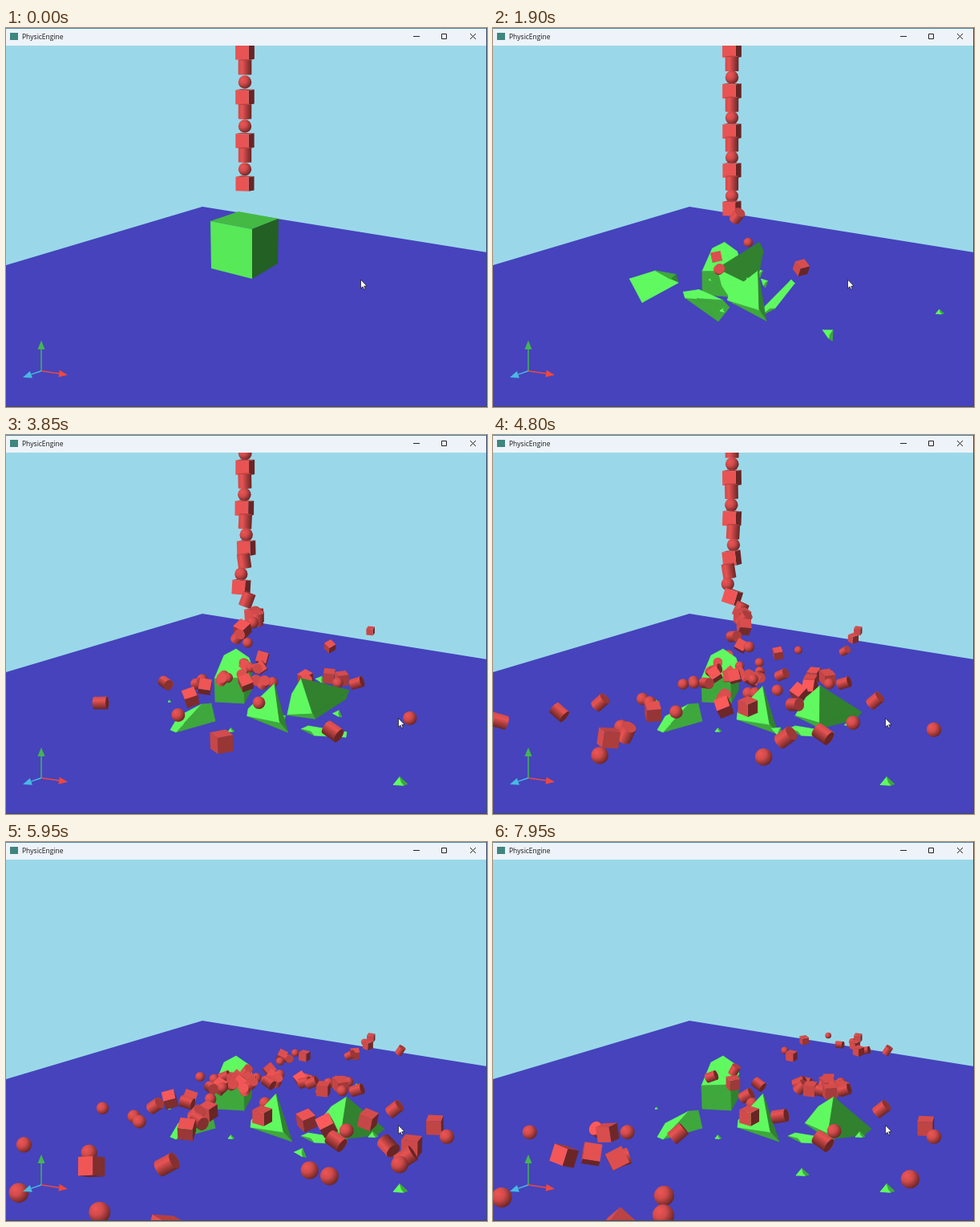
Recreate the animation shown at these times as an HTML page with a canvas. Size 600 px wide and 473 px high, loop 8 s.

```html
<!DOCTYPE html>
<html lang="en">
<head>
<meta charset="utf-8">
<title>PhysicEngine</title>
<style>
  html, body { margin: 0; width: 100%; height: 100%; overflow: hidden; background: #9ad8e9; }
  canvas { display: block; }
</style>
</head>
<body>
<canvas id="stage" width="600" height="473"></canvas>
<script>
const ctx = document.getElementById('stage').getContext('2d');
const LOOP = 8, BREAK = 1.15, COUNT = 93; // times in seconds
const LIGHT = [-0.45, -0.45, 0.77];

const clamp = (v, lo = 0, hi = 1) => Math.min(hi, Math.max(lo, v));
const mix = (a, b, u) => a + (b - a) * u;
const smooth = u => { u = clamp(u); return u * u * (3 - 2 * u); };
const random = seed => { const v = Math.sin(seed * 127.1 + 3.7) * 43758.5453; return v - Math.floor(v); };

function polygon(points, fill, outline) {
  ctx.beginPath();
  points.forEach(([x, y]) => ctx.lineTo(x, y));
  ctx.closePath();
  ctx.fillStyle = fill;
  ctx.fill();
  if (!outline) return;
  ctx.strokeStyle = outline;
  ctx.lineWidth = 0.7;
  ctx.stroke();
}

// ---------- red solids ----------
function rotate([x, y, z], [yaw, pitch, roll]) {
  let c = Math.cos(yaw), s = Math.sin(yaw);
  [x, z] = [x * c - z * s, x * s + z * c];
  c = Math.cos(pitch); s = Math.sin(pitch);
  [y, z] = [y * c + z * s, z * c - y * s];
  c = Math.cos(roll); s = Math.sin(roll);
  return [x * c - y * s, x * s + y * c, z];
}

const red = level => `rgb(${[243, 87, 87].map(c => Math.round(c * level))})`;

function shade(normal) {
  const dot = normal.reduce((sum, v, i) => sum + v * LIGHT[i], 0);
  return red(0.43 + 0.62 * Math.max(0, dot));
}

function drawBox({ x, y, size, angles }) {
  for (let axis = 0; axis < 3; axis++) for (const side of [-1, 1]) {
    const place = (a, b) => {
      const v = [0, 0, 0];
      v[axis] = side; v[(axis + 1) % 3] = a; v[(axis + 2) % 3] = b;
      return rotate(v, angles);
    };
    const normal = place(0, 0);
    if (normal[2] <= 0) continue;
    const corners = [place(1, 1), place(1, -1), place(-1, -1), place(-1, 1)];
    polygon(corners.map(v => [x + v[0] * size / 2, y + v[1] * size / 2]), shade(normal));
  }
}

function drawBall({ x, y, size }) {
  const r = size * 0.46;
  const g = ctx.createRadialGradient(x - r * 0.4, y - r * 0.4, 0, x - r * 0.3, y - r * 0.3, r * 1.4);
  g.addColorStop(0, red(0.98));
  g.addColorStop(0.45, red(0.86));
  g.addColorStop(1, red(0.43));
  ctx.fillStyle = g;
  ctx.beginPath();
  ctx.arc(x, y, r, 0, 7);
  ctx.fill();
}

function drawCylinder({ x, y, size, angles }) {
  let axis = rotate([0, -1, 0], angles);
  if (axis[2] < 0) axis = axis.map(v => -v);
  const r = size * 0.46, turn = Math.atan2(axis[1], axis[0]);
  const half = size * 0.5 * Math.hypot(axis[0], axis[1]), flat = r * axis[2];
  const lit = Math.cos(turn) > Math.sin(turn) ? -r : r;
  const g = ctx.createLinearGradient(0, lit, 0, -lit);
  g.addColorStop(0, red(0.86));
  g.addColorStop(0.3, red(0.95));
  g.addColorStop(1, red(0.43));
  ctx.save();
  ctx.translate(x, y);
  ctx.rotate(turn);
  ctx.beginPath();
  ctx.ellipse(-half, 0, flat, r, 0, Math.PI / 2, Math.PI * 1.5);
  ctx.ellipse(half, 0, flat, r, 0, -Math.PI / 2, Math.PI / 2);
  ctx.fillStyle = g;
  ctx.fill();
  ctx.beginPath();
  ctx.ellipse(half, 0, flat, r, 0, 0, 7);
  ctx.fillStyle = shade(axis);
  ctx.fill();
  ctx.restore();
}

// How many solids have left the accelerating column.
const flow = t => t * t * mix(2.14, 3.01, smooth((t - 1.6) / 3.3)) - 1.77;

// Floor position to screen: across from the middle, and depth (1 is near the cube).
const project = (across, depth) => ({ x: 300 + across / depth, y: 155 + 160 / depth, size: 15.2 / depth });

// Floor regions the solids head for: across range, depth range.
const REGIONS = {
  left: [-190, -15, 0.55, 0.95],
  front: [15, 160, 0.55, 0.78],
  pile: [85, 150, 1, 1.12],
  back: [90, 310, 1.4, 1.9],
  middle: [-35, 45, 0.82, 1.25],
  right: [30, 220, 0.54, 0.9],
};
const SETTLING = ['pile', 'back', 'pile', 'right', 'middle'];

const bodies = Array.from({ length: COUNT }, (_, rank) => {
  const dice = n => random(rank + n * 100);
  const rolls = dice(1) < 0.8 - rank * 0.006;
  const region = rolls ? (dice(2) < 0.75 ? 'left' : 'front') : SETTLING[rank % SETTLING.length];
  const [left, right, near, far] = REGIONS[region];
  let leave = 0;
  while (flow(leave) < rank) leave += 0.002;
  return {
    rank, rolls, leave,
    draw: [drawBox, drawBall, drawCylinder][rank % 3],
    across: mix(left, right, dice(3)),
    depth: mix(near, far, dice(4)),
    start: [mix(-30, 30, dice(5)), mix(1.1, 1.3, dice(6))],
    yaw: dice(7) * 1.4,
    roll: rank % 3 === 2 ? 0.3 + dice(8) * 2 : 0,
  };
});

function columnPose(slot, t) {
  const spread = mix(1.1, 1, clamp(t / 1.5));
  const wave = 14 * clamp((t - 2.2) / 1.5) * Math.exp(-slot / 3);
  return {
    x: 298 + wave * Math.cos(1.05 * slot),
    y: 225 - spread * (15.8 * slot + 0.06 * slot * slot),
    size: 17.5 + slot * 0.06,
    angles: [0.4, 0.08, wave * 0.04 * Math.sin(1.05 * slot + 0.6)],
  };
}

function bodyPose(body, t) {
  const slot = body.rank - flow(t);
  if (slot >= 0) return columnPose(slot, t);

  const FALL = 0.3, age = t - body.leave;
  const roll = Math.max(0, age - FALL) / 2;
  const travel = body.rolls ? roll : 1 - (1 - clamp(roll)) ** 3;
  const depth = mix(body.start[1], body.depth, travel);
  if (depth < 0.3) return null;

  const from = columnPose(0, body.leave);
  const floor = project(mix(body.start[0], body.across, travel), depth);
  const drop = clamp(age / FALL);
  const tumble = (1 - travel) * 4;
  return {
    x: mix(from.x, floor.x, drop),
    y: mix(from.y, floor.y, drop * drop),
    size: mix(from.size, floor.size, drop),
    angles: [
      mix(0.4, body.yaw + tumble, drop),
      mix(0.08, 0.4 + tumble * 0.3, drop),
      body.roll * drop + tumble * drop * (body.yaw - 0.7) * 0.5,
    ],
  };
}

// ---------- green cube and its pieces ----------
const TONES = { B: '#60fa60', M: '#3fa83c', D: '#31812f' };

// A shard is a fan of facets around its peak, one tone letter per outline edge.
// It travels from an offset to its resting place in "span" seconds.
const shards = [
  { outline: [[260, 304], [272, 275], [287, 267], [303, 278], [307, 290], [306, 319], [297, 335], [261, 333]],
    peak: [296, 303], tones: 'BBBBDDMM', from: [8, 5], span: 0.9, turn: 0.2 },
  { outline: [[205, 368], [215, 351], [244, 336], [256, 335], [261, 357], [212, 371]],
    peak: [222, 360], tones: 'BBMMMB', from: [65, -45], span: 1.7, turn: 1.8 },
  { outline: [[306, 347], [337, 314], [357, 374], [305, 356]],
    peak: [346, 362], tones: 'BDMB', from: [-18, -13], span: 4, turn: 0.2 },
  { outline: [[389, 351], [406, 330], [425, 318], [472, 358], [463, 366], [418, 371]],
    peak: [418, 364], tones: 'BBDDDM', from: [-122, -55], span: 4.2, turn: -1.6 },
  { outline: [[368, 367], [377, 363], [425, 371], [424, 377], [384, 375]],
    peak: [380, 370], tones: 'BBBBM', from: [-80, -45], span: 1.5, turn: -2.2 },
  { outline: [[67, 374], [72, 341], [104, 352], [122, 371], [118, 381]],
    peak: [113, 372], tones: 'BBMDB', from: [205, -110], span: 1.6, turn: -1.2, flies: true },
];

function addChip(x, y, size, span, flies) {
  const corners = [[-1, 0.5], [-0.1, -0.6], [1, 0.4], [0.4, 0.6]];
  shards.push({
    outline: corners.map(([u, v]) => [x + u * size, y + v * size]),
    peak: [x + size * 0.2, y + size * 0.3],
    tones: 'BMMB', from: [305 - x, 305 - y], span, turn: size / 4, flies,
  });
}
addChip(492, 432, 9, 1.4);
addChip(458, 365, 6, 4.2);
addChip(386, 412, 8, 6.8);
addChip(438, 305, 6, 4.6);
addChip(281, 368, 4, 1.1);
addChip(204, 332, 2, 2.6);
addChip(557, 354, 5, 0.75, true);

function shardPose({ from, span, turn, flies, peak }, t) {
  const u = (t - BREAK) / span;
  const remaining = flies ? 1 - u : (1 - clamp(u)) ** 1.2;
  return { x: peak[0] + from[0] * remaining, y: peak[1] + from[1] * remaining, turn: turn * remaining };
}

function drawShard({ outline, peak, tones }, pose) {
  ctx.save();
  ctx.translate(pose.x, pose.y);
  ctx.rotate(pose.turn);
  ctx.translate(-peak[0], -peak[1]);
  outline.forEach((point, i) => {
    const tone = TONES[tones[i]];
    polygon([peak, point, outline[(i + 1) % outline.length]], tone, tone);
  });
  ctx.restore();
}

function drawCube(t) {
  const left = [255, 241], front = [307, 251], right = [340, 238], foot = [307, 313];
  ctx.save();
  ctx.translate(0, 45 * (t / BREAK) ** 2);
  polygon([left, [290, 229], right, front], '#44b944');
  polygon([left, front, foot, [256, 300]], '#57e957');
  polygon([front, right, [339, 294], foot], '#236023');
  ctx.restore();
}

// ---------- surroundings ----------
function drawArrow(x, y, color) {
  const ox = 44, oy = 428, length = Math.hypot(x - ox, y - oy);
  const ux = (x - ox) / length, uy = (y - oy) / length, bx = x - ux * 11, by = y - uy * 11;
  ctx.strokeStyle = color;
  ctx.lineWidth = 1.5;
  ctx.beginPath();
  ctx.moveTo(ox, oy);
  ctx.lineTo(bx, by);
  ctx.stroke();
  polygon([[x, y], [bx - uy * 4.5, by + ux * 4.5], [bx + uy * 4.5, by - ux * 4.5]], color);
}

function drawAxes() {
  drawArrow(44, 390, '#43b552');
  drawArrow(77, 433, '#ee4840');
  drawArrow(21, 436, '#48b9e2');
}

function drawRoom() {
  ctx.fillStyle = '#9ad8e9';
  ctx.fillRect(0, 0, 600, 473);
  polygon([[0, 296], [245, 223], [600, 280], [600, 473], [0, 473]], '#4643bc');
}

function drawWindow() {
  ctx.fillStyle = '#edf3f9';
  ctx.fillRect(0, 0, 600, 22);
  ctx.fillStyle = '#4a88b0';
  ctx.fillRect(0, 0, 600, 1);
  ctx.fillStyle = '#3b4a6b';
  ctx.fillRect(599, 0, 1, 473);
  ctx.fillRect(0, 472, 600, 1);
  ctx.fillStyle = '#3f8580';
  ctx.fillRect(5, 6, 10, 9);
  ctx.fillStyle = '#151515';
  ctx.font = '8.5px "Open Sans", "Noto Sans", sans-serif';
  ctx.fillText('PhysicEngine', 20, 14);
  ctx.strokeStyle = '#222';
  ctx.lineWidth = 1;
  ctx.beginPath();
  ctx.moveTo(508, 10.5); ctx.lineTo(516, 10.5);
  ctx.rect(543.5, 7.5, 6, 6);
  ctx.moveTo(579, 7); ctx.lineTo(586, 14);
  ctx.moveTo(586, 7); ctx.lineTo(579, 14);
  ctx.stroke();
}

function drawCursor(t) {
  const move = smooth((t - 2.25) / 0.35);
  ctx.save();
  ctx.translate(mix(442.5, 489.5, move), mix(314, 353.5, move));
  polygon([[0, 0], [0, 11], [2.5, 8.8], [4.2, 12.3], [5.8, 11.6], [4.2, 8.2], [7.6, 8]], '#fff', '#111');
  ctx.restore();
}

function frame(now) {
  const t = now / 1000 % LOOP;
  const parts = [];
  for (const body of bodies) {
    const pose = bodyPose(body, t);
    if (pose) parts.push({ y: pose.y, draw: () => body.draw(pose) });
  }
  if (t < BREAK) parts.push({ y: 230, draw: () => drawCube(t) });
  else for (const shard of shards) {
    const pose = shardPose(shard, t);
    parts.push({ y: pose.y - 25, draw: () => drawShard(shard, pose) });
  }
  drawRoom();
  parts.sort((a, b) => a.y - b.y).forEach(part => part.draw());
  drawAxes();
  drawWindow();
  drawCursor(t);
  requestAnimationFrame(frame);
}
requestAnimationFrame(frame);
</script>
</body>
</html>
```
